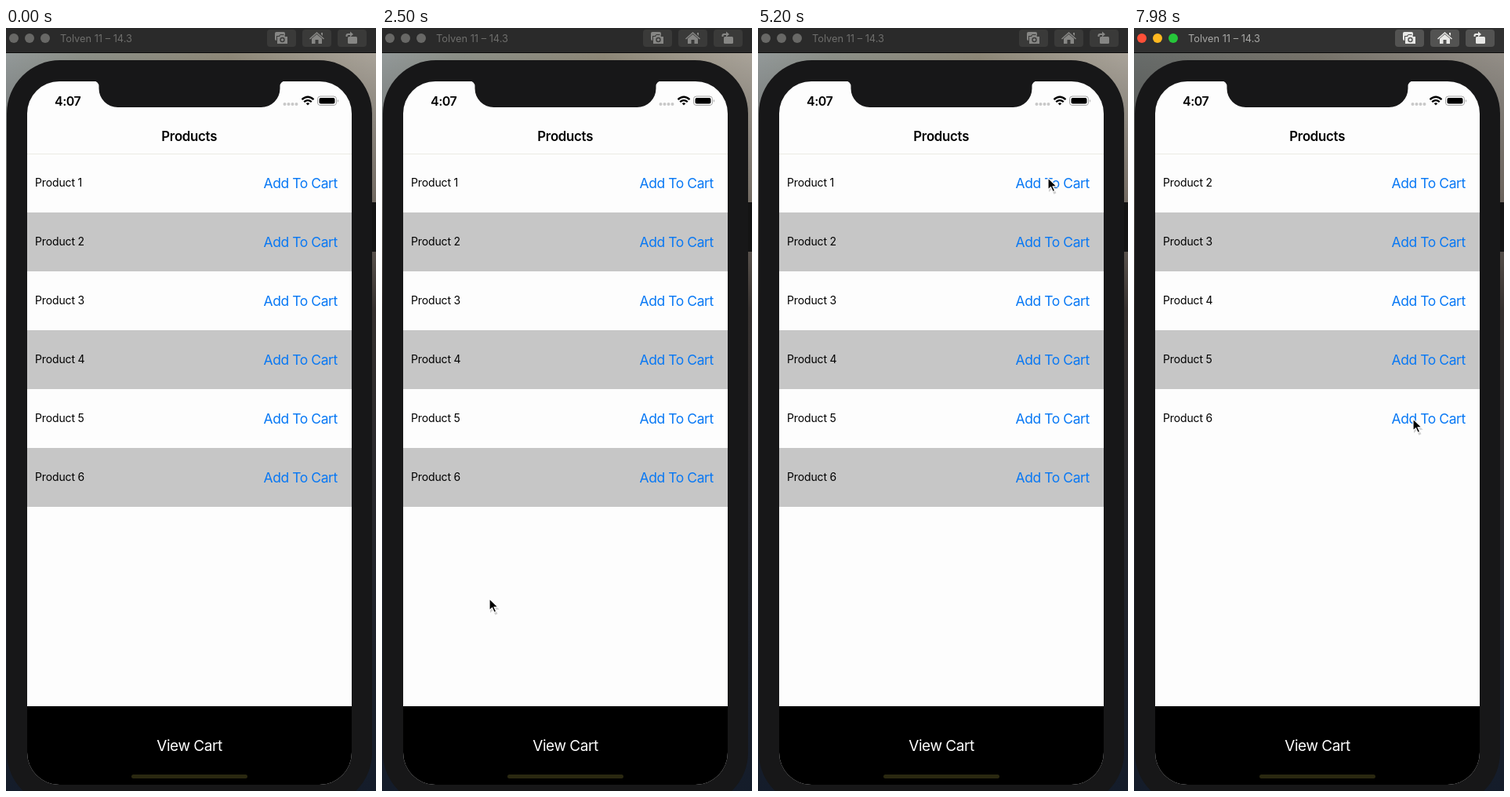
These frames come from a looping animation (472 by 972 pixels, 8000 ms). An HTML page:

```html
<!DOCTYPE html>
<html lang="en">
<head>
<meta charset="utf-8">
<title>Product list</title>
<style>
  html, body { margin: 0; width: 100%; height: 100%; overflow: hidden; background: #171718; }
  svg { display: block; width: 472px; height: 972px; font-family: Inter, Roboto, sans-serif; }
  .title { font-size: 12.8px; fill: #6e6e6c; }
  .bar { fill: #2a2a2a; }
  .button { fill: #3a3a39; }
  .icon { color: #868684; }
  .light { fill: #686866; }
  .sky-active { display: none; }
  .active .title { fill: #a8a8a6; }
  .active .bar { fill: #303030; }
  .active .button { fill: #535352; }
  .active .icon { color: #e8e8e6; }
  .active .red { fill: #ff5038; }
  .active .amber { fill: #ffb820; }
  .active .green { fill: #26c63a; }
  .active .sky-active { display: inline; }
  .time { font-size: 16px; font-weight: 600; letter-spacing: -.03em; }
  .heading { font-size: 16.8px; font-weight: 600; letter-spacing: -.015em; }
  .name { font-size: 14px; letter-spacing: -.01em; }
  .add { font-size: 17.5px; letter-spacing: -.025em; fill: #0878f4; }
  .view { font-size: 19px; letter-spacing: -.025em; fill: #fff; }
  .mid { text-anchor: middle; }
</style>
</head>
<body>
<svg id="stage" viewBox="0 0 472 972">
  <defs>
    <linearGradient id="sky">
      <stop offset="0" stop-color="#949a9a"/><stop offset=".2" stop-color="#8c9088"/>
      <stop offset=".6" stop-color="#8e8878"/><stop offset="1" stop-color="#aaa49a"/>
    </linearGradient>
    <linearGradient id="skyActive">
      <stop offset="0" stop-color="#686c6a"/><stop offset=".5" stop-color="#77736a"/>
      <stop offset="1" stop-color="#948f88"/>
    </linearGradient>
    <linearGradient id="dusk" x2="0" y2="1">
      <stop offset="0" stop-color="#2a2a2a" stop-opacity="0"/>
      <stop offset=".18" stop-color="#504740" stop-opacity=".55"/>
      <stop offset=".35" stop-color="#35302e"/>
      <stop offset="1" stop-color="#141c2a"/>
    </linearGradient>
    <clipPath id="screen"><rect x="27" y="68" width="414" height="896" rx="41"/></clipPath>
  </defs>

  <!-- desktop -->
  <rect y="31" width="472" height="941" fill="url(#sky)"/>
  <rect class="sky-active" y="31" width="472" height="941" fill="url(#skyActive)"/>
  <rect y="31" width="472" height="941" fill="url(#dusk)"/>

  <!-- window bar -->
  <rect class="bar" width="472" height="31"/>
  <rect y="31" width="472" height="1" fill="#0c0c0c"/>
  <circle class="light red" cx="10" cy="13" r="6"/>
  <circle class="light amber" cx="30" cy="13" r="6"/>
  <circle class="light green" cx="50" cy="13" r="6"/>
  <text class="title" x="69" y="18">Tolven 11 – 14.3</text>
  <g class="button">
    <rect x="333" y="2" width="37" height="22" rx="4"/>
    <rect x="378" y="2" width="37" height="22" rx="4"/>
    <rect x="423" y="2" width="37" height="22" rx="4"/>
  </g>
  <g class="icon" fill="currentColor">
    <rect x="343" y="5" width="13" height="11" rx="2"/>
    <path class="button" d="M345 10h3l2-2h4l2 2h4v11h-15z"/>
    <path d="M346 11h3l1-2h5l1 2h3v9h-13z"/>
    <circle class="button" cx="352.500" cy="15" r="3.200"/>
    <circle cx="352.500" cy="15" r="1.800"/>
    <path d="M387 13.500 396.500 5l9.500 8.500-1 1-8.500-7.500-8.500 7.500z"/>
    <path d="M390 13.500l6.500-5.500 6.500 5.500V20h-4.500v-5h-4v5H390z"/>
    <path d="M402 6h2v4l-2-2z"/>
    <rect x="436" y="11" width="12" height="9" rx="1.500"/>
    <path d="M433.500 11V9.500Q433.500 7 436 7h3V4.500l4 3.500-4 3.500V9h-2.500q-1 0-1 2z"/>
  </g>

  <!-- phone -->
  <rect x="465" y="222" width="7" height="63" fill="#141414"/>
  <rect x="1" y="41" width="466" height="950" rx="68" fill="#171718"/>
  <g clip-path="url(#screen)">
    <rect x="27" y="68" width="414" height="896" fill="#fdfdfd"/>
    <rect x="27" y="160" width="414" height="1" fill="#ebebe4"/>
    <g id="list"></g>
    <rect x="27" y="864" width="414" height="100"/>
    <rect x="160" y="951" width="148" height="5" rx="2.500" fill="#2a2810"/>
  </g>
  <path fill="#171718" d="M112 67.500a6.500 6.500 0 0 1 6.500 6.500v3a24 24 0 0 0 24 24h183a24 24 0 0 0 24-24v-3a6.500 6.500 0 0 1 6.500-6.500z"/>
  <text class="time" x="62" y="98.500">4:07</text>
  <g fill="#c8c8c8">
    <circle cx="355.500" cy="97" r="2"/><circle cx="360.500" cy="97" r="2"/>
    <circle cx="365.500" cy="97" r="2"/><circle cx="370.500" cy="97" r="2"/>
  </g>
  <g fill="none" stroke="#000" stroke-width="2.300">
    <path d="M377.500 91.200q7.500-6.800 15 0M380.200 94.200q4.800-4.200 9.600 0"/>
    <path d="M385 98.500l-2.300-2.400q2.300-1.800 4.600 0z" fill="#000" stroke="none"/>
  </g>
  <rect x="397.500" y="87" width="24" height="11.500" rx="3.500" fill="none" stroke="#a4a4a4"/>
  <rect x="399.500" y="89" width="20" height="7.500" rx="2"/>
  <path d="M423 91q2 1.700 0 3.700z" fill="#a4a4a4"/>
  <text class="heading mid" x="233.700" y="144">Products</text>
  <text class="view mid" x="234" y="921">View Cart</text>

  <g id="cursor">
    <path d="M1 2v16l3.500-3.200 3 6 3-1.500-2.800-5.500h5z" fill="#000" opacity=".18"/>
    <path d="M0 0v15l3.500-3.200 2.600 5.700 2.600-1.200-2.600-5.500h5z" fill="#000" stroke="#fdfdfd" stroke-width="1.200"/>
  </g>
</svg>
<script>
const LOOP = 8000, ROW = 75, ADD_AT = 5480;
const stage = document.getElementById('stage');
const list = document.getElementById('list');
const cursor = document.getElementById('cursor');

// Pointer stops: time, x, y
const stops = [
  [500, 113, 760], [820, 137, 727], [2500, 137, 727], [3100, 252, 339],
  [3340, 262, 330], [4080, 397, 283], [4300, 397, 283], [5020, 370, 191],
  [5620, 370, 191], [6000, 370, 280], [6500, 370, 280], [7700, 356, 498],
  [LOOP, 356, 498]
];

function productRow(number, index) {
  const y = 160 + index * ROW;
  const band = index % 2 ? `<rect x="27" y="${y}" width="414" height="${ROW}" fill="#c6c6c6"/>` : '';
  return `${band}<text class="name" x="37" y="${y + 42}">Product ${number}</text>
    <text class="add mid" x="375.700" y="${y + 44}">Add To Cart</text>`;
}

let shown;
function showProducts(first) {
  if (first === shown) return;
  shown = first;
  const numbers = [1, 2, 3, 4, 5, 6].filter(n => n >= first);
  list.innerHTML = numbers.map(productRow).join('');
  stage.classList.toggle('active', first > 1);
}

function moveCursor(time) {
  const next = stops.findIndex(stop => stop[0] > time);
  cursor.style.display = next > 0 ? '' : 'none';
  if (next < 1) return;
  const [t0, x0, y0] = stops[next - 1], [t1, x1, y1] = stops[next];
  const u = (time - t0) / (t1 - t0), ease = u * u * (3 - 2 * u);
  cursor.setAttribute('transform', `translate(${x0 + (x1 - x0) * ease} ${y0 + (y1 - y0) * ease})`);
}

const start = performance.now();
function draw() {
  const time = (performance.now() - start) % LOOP;
  showProducts(time < ADD_AT ? 1 : 2);
  moveCursor(time);
  requestAnimationFrame(draw);
}
draw();
</script>
</body>
</html>
```
